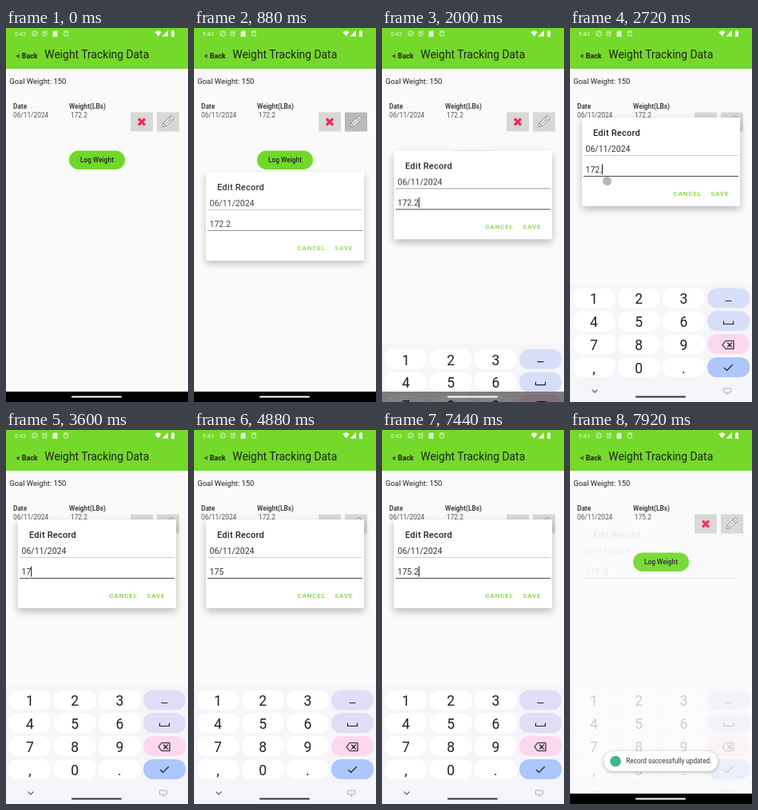
Animation, 228 px wide and 468 px high, one loop 8 s. Source, as an HTML page:

```html
<!DOCTYPE html>
<html lang="en">
<head>
<meta charset="utf-8">
<title>Weight tracking</title>
<style>
html, body { margin: 0; width: 228px; height: 468px; overflow: hidden; background: #fafafa; }
svg { display: block; }
text { font-family: Roboto, "Open Sans", sans-serif; fill: #222; }
.bold { font-weight: 700; }
.medium { font-weight: 500; }
.mid { text-anchor: middle; }
.small { font-size: 8.32px; }
.field { font-size: 10.54px; fill: #333; }
.action { font-size: 8px; font-weight: 500; letter-spacing: .9px; fill: #72d936; }
.line { fill: none; stroke: #222; stroke-width: 1.2; stroke-linecap: round; stroke-linejoin: round; }
.panel { fill: #fff; filter: drop-shadow(0 4px 5px rgba(0, 0, 0, .26)); }
.bubble { fill: #fff; filter: drop-shadow(0 1px 2px rgba(0, 0, 0, .3)); }
.digit { font-size: 17.6px; text-anchor: middle; }

/* One percent is 80 ms. */
.dialog, .pads, .nav, .toast, .edit, .date-line, .weight-line, .handle, .side { animation: 8s linear infinite; }
.dialog { animation-name: dialog; }
.pads { animation-name: pads; }
.nav { animation-name: nav; }
.toast { animation-name: toast; }
.edit { animation-name: press; }
.date-line { animation-name: date-line; }
.weight-line { animation-name: weight-line; }
.handle { animation-name: handle; }
.side { animation-name: side; }

@keyframes dialog {
  0%, 9.9% { opacity: 0; transform: translateY(1px); }
  10% { opacity: .6; transform: translateY(1px); }
  11% { opacity: .9; transform: translateY(1px); }
  14%, 24% { opacity: 1; transform: none; animation-timing-function: ease-out; }
  28%, 95% { opacity: 1; transform: translateY(-67px); }
  97% { opacity: .12; transform: translateY(-67px); }
  100% { opacity: .05; transform: translateY(-67px); }
}
@keyframes pads {
  0%, 23.5% { opacity: 1; transform: translateY(150px); animation-timing-function: ease-out; }
  28%, 95% { opacity: 1; transform: none; }
  97% { opacity: .25; transform: none; }
  100% { opacity: .18; transform: none; }
}
@keyframes nav {
  0%, 24% { opacity: 1; }
  26%, 95.5% { opacity: 0; }
  96.5%, 100% { opacity: 1; }
}
@keyframes toast {
  0%, 96.5% { opacity: 0; }
  98.5%, 100% { opacity: 1; }
}
@keyframes press {
  0%, 9% { fill: #d8d8d8; }
  10%, 14% { fill: #bababa; }
  18%, 100% { fill: #d8d8d8; }
}
@keyframes date-line {
  0%, 21.9% { stroke: #c9c9c9; }
  22%, 24% { stroke: #6c6c6c; }
  26%, 100% { stroke: #cfcfcf; }
}
@keyframes weight-line {
  0%, 21.9% { stroke: #858585; }
  22%, 100% { stroke: #4a4a4a; }
}
@keyframes handle {
  0%, 26% { opacity: 0; }
  28%, 34% { opacity: 1; }
  36%, 100% { opacity: 0; }
}
@keyframes side {
  0%, 34% { fill: #d6dff7; }
  42%, 100% { fill: #e1ddf5; }
}
</style>
</head>
<body>
<svg width="228" height="468" viewBox="0 0 228 468">
  <rect width="228" height="468" fill="#fafafa"/>

  <!-- Header -->
  <rect width="228" height="51" fill="#74d92b"/>
  <g opacity=".8">
    <text x="10.5" y="10" font-size="7.6" style="fill:#fff">5:43</text>
    <g fill="none" stroke="#fff">
      <circle cx="36" cy="7" r="3.2"/><path d="M34.5 8.5l3-3"/>
      <circle cx="48.5" cy="7.5" r="2.7"/><path d="M45.5 4.5l1.5-1M51.5 4.5l-1.5-1M48.5 6v2"/>
      <circle cx="75" cy="7.5" r="2.7"/><path d="M72 4h6"/>
    </g>
    <path d="M60 3.5h4.5v7.5h-6V5z" fill="#fff"/>
  </g>
  <path d="M186.5 5q4-3.5 8 0l-4 5.500zM203 3v7.500h-7.500zM207 4h1v-1h2v1h1v7h-4z" fill="#fff"/>
  <text x="13" y="38" class="bold" font-size="8.88">&lt; Back</text>
  <text x="48.3" y="38" font-size="13.87">Weight Tracking Data</text>

  <!-- Record list -->
  <text x="4.300" y="70.3" font-size="9.43">Goal Weight: 150</text>
  <text x="9" y="100.500" class="bold small" style="fill:#444">Date</text>
  <text x="79" y="100.500" class="bold small" style="fill:#444">Weight(LBs)</text>
  <text x="9" y="111.500" class="small" style="fill:#555">06/11/2024</text>
  <text x="81" y="111.500" class="small" style="fill:#555" id="saved">172.2</text>
  <rect x="156" y="105.500" width="28" height="24" fill="#d8d8d8"/>
  <path d="M166 113.500l8 8M174 113.500l-8 8" stroke="#ee2b55" stroke-width="3.2"/>
  <rect class="edit" x="189" y="105.500" width="28" height="24"/>
  <g transform="translate(202.500 117.500) rotate(-43)" fill="#f1f1f1" stroke="#8a8a8a" stroke-width=".9">
    <path d="M-9 0l4-2.700H7q2 0 2 2.700t-2 2.700H-5z"/>
    <path d="M-5-2.700v5.400M4-2.700v5.400M6-2.700v5.400M-5 0h9"/>
  </g>
  <rect x="79" y="153.500" width="70" height="23.500" rx="11.75" fill="#70d82b"/>
  <text x="114" y="168.300" class="medium small mid">Log Weight</text>

  <!-- Edit dialog -->
  <g class="dialog">
    <rect class="panel" x="15" y="179" width="198" height="111" rx="1.500"/>
    <text x="29" y="202" class="medium" font-size="11.1" letter-spacing=".2">Edit Record</text>
    <text x="19.500" y="222" class="field">06/11/2024</text>
    <path class="date-line" d="M17 226.500H211"/>
    <text x="19.500" y="248" class="field" id="weight">172.2</text>
    <rect id="caret" y="237.500" width="1.1" height="13" fill="#222"/>
    <path class="weight-line" d="M17 252.500H211"/>
    <circle class="handle" cx="46.500" cy="258.500" r="5.500" fill="#b4b6ba"/>
    <text x="129.300" y="276.800" class="action">CANCEL</text>
    <text x="176.300" y="276.800" class="action">SAVE</text>
  </g>

  <!-- Number pad -->
  <g class="pads">
    <rect y="319" width="228" height="149" fill="#f6f5fa"/>
    <g id="keys"></g>
    <path class="line" d="M195 341.500h7M192.500 367v3.500h12V367"/>
    <path class="line" d="M191 396.500l4-5h10v10h-10zM197.500 394l5 5M202.500 394l-5 5"/>
    <path class="line" d="M193.500 425.500l3 3 7-7"/>
    <path class="line" d="M28 453l3 3 3-3" style="stroke:#666"/>
    <rect x="192.500" y="451" width="9" height="5" fill="none" stroke="#888" stroke-dasharray="1.300 .8"/>
    <path d="M196 458h2.500" stroke="#888"/>
    <rect x="82" y="460.500" width="63" height="2" rx="1" fill="#333"/>
  </g>

  <g class="nav">
    <rect y="455" width="228" height="13"/>
    <rect x="82" y="460.500" width="63" height="2" rx="1" fill="#fff"/>
  </g>

  <g class="toast">
    <rect class="bubble" x="42.500" y="402" width="142.500" height="25" rx="12"/>
    <circle cx="57" cy="414.500" r="6.800" fill="#43b58b"/>
    <text x="70.300" y="417.300" font-size="8.2" style="fill:#333">Record successfully updated.</text>
  </g>
</svg>
<script>
const byId = id => document.getElementById(id);
const weight = byId("weight"), caret = byId("caret"), saved = byId("saved");

const sideKeys = ['class="side"', 'class="side"', 'fill="#fcd8ee"', 'fill="#adc6fc"'];
byId("keys").innerHTML = ["123", "456", "789", ",0."].map((row, r) => {
  const y = 325.5 + r * 28.8;
  const key = (col, look) =>
    `<rect x="${3.5 + col * 56.2}" y="${y}" width="53" height="25" rx="12" ${look}/>`;
  const digits = [...row].map((label, col) => key(col, 'fill="#fff"') +
    `<text class="digit" x="${30 + col * 56.2}" y="${y + 19.8}">${label}</text>`);
  return digits.join("") + key(3, sideKeys[r]);
}).join("");

const edits = [[0, "172.2"], [2640, "172."], [3040, "172"], [3440, "17"],
  [3920, "175"], [5600, "175."], [6240, "175.2"]];
const caretOn = [[1760, 4320], [4880, 5360], [5600, 6800], [7280, 8000]];
const clock = document.querySelector(".dialog").getAnimations()[0];

function draw() {
  const t = (clock.currentTime || 0) % 8000;
  const value = edits.filter(([start]) => t >= start).pop()[1];
  if (weight.textContent !== value) weight.textContent = value;
  caret.setAttribute("x", 19.3 + weight.getComputedTextLength());
  caret.style.opacity = caretOn.some(([from, to]) => t >= from && t < to) ? 1 : 0;
  saved.textContent = t < 7680 ? "172.2" : "175.2";
  requestAnimationFrame(draw);
}
draw();
</script>
</body>
</html>
```
